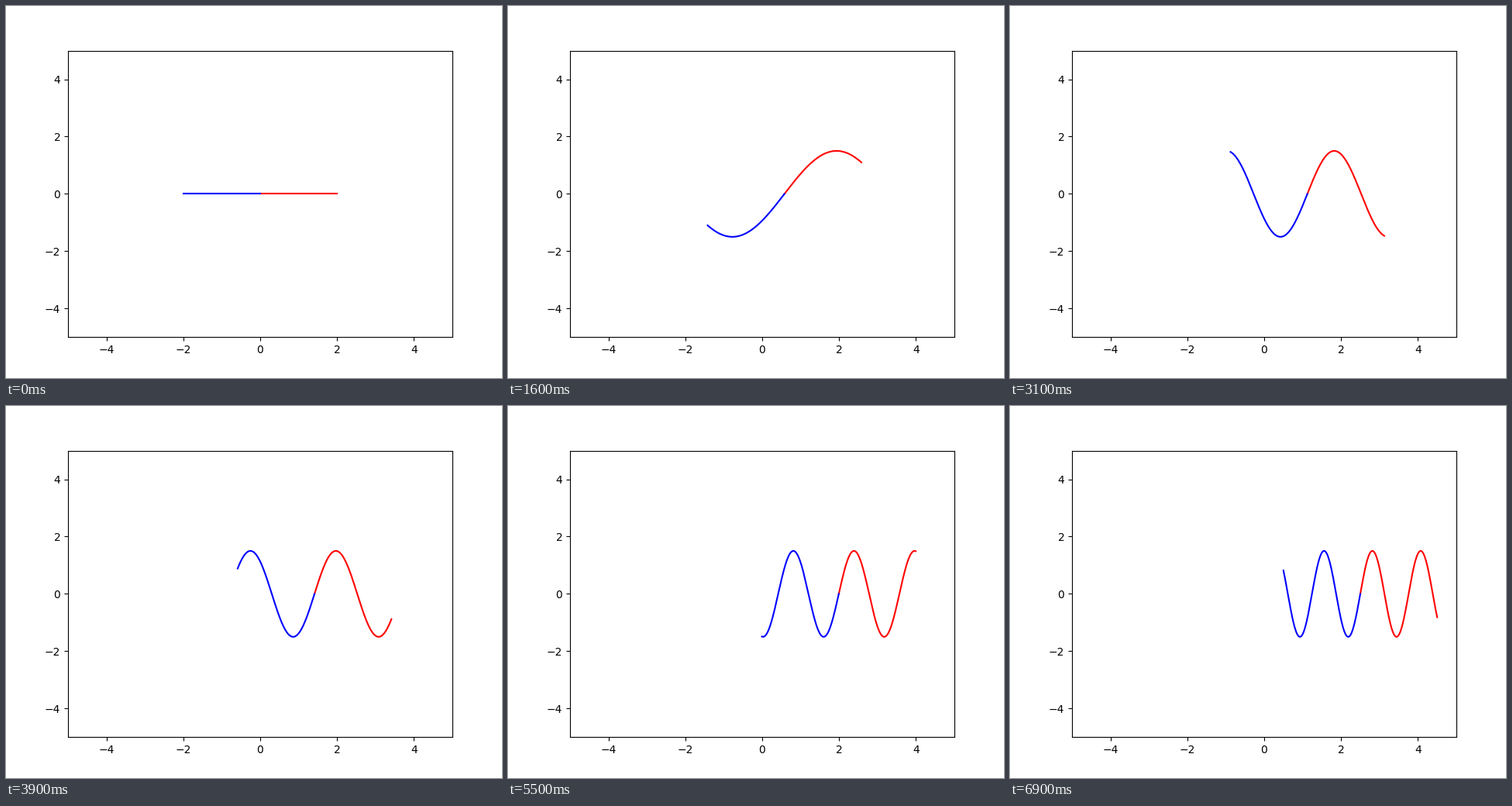
A matplotlib script for the animation above (7000 ms loop, 640x480 px).

```python
import matplotlib.pyplot as plt
import numpy as np
from matplotlib.animation import FuncAnimation

FRAMES = 70
INTERVAL = 100
AMPLITUDE = 1.5
HALF_WIDTH = 2
SHIFTS = np.linspace(0, 2.5, FRAMES)

fig, ax = plt.subplots(figsize=(6.4, 4.8), dpi=100)
ax.set_xlim(-5, 5)
ax.set_ylim(-5, 5)

right, = ax.plot([], [], color="red", lw=1.5)
left, = ax.plot([], [], color="blue", lw=1.5)
offsets = np.linspace(0, HALF_WIDTH, 200)


def update(i):
    # The wave's centre moves right while its frequency grows in step.
    shift = SHIFTS[i]
    wave = AMPLITUDE * np.sin(2 * shift * offsets)
    right.set_data(shift + offsets, wave)
    left.set_data(shift - offsets, -wave)
    return right, left


def init():
    return update(0)


anim = FuncAnimation(fig, update, frames=FRAMES, init_func=init,
                     interval=INTERVAL, repeat=True, repeat_delay=0)
plt.show()
```
